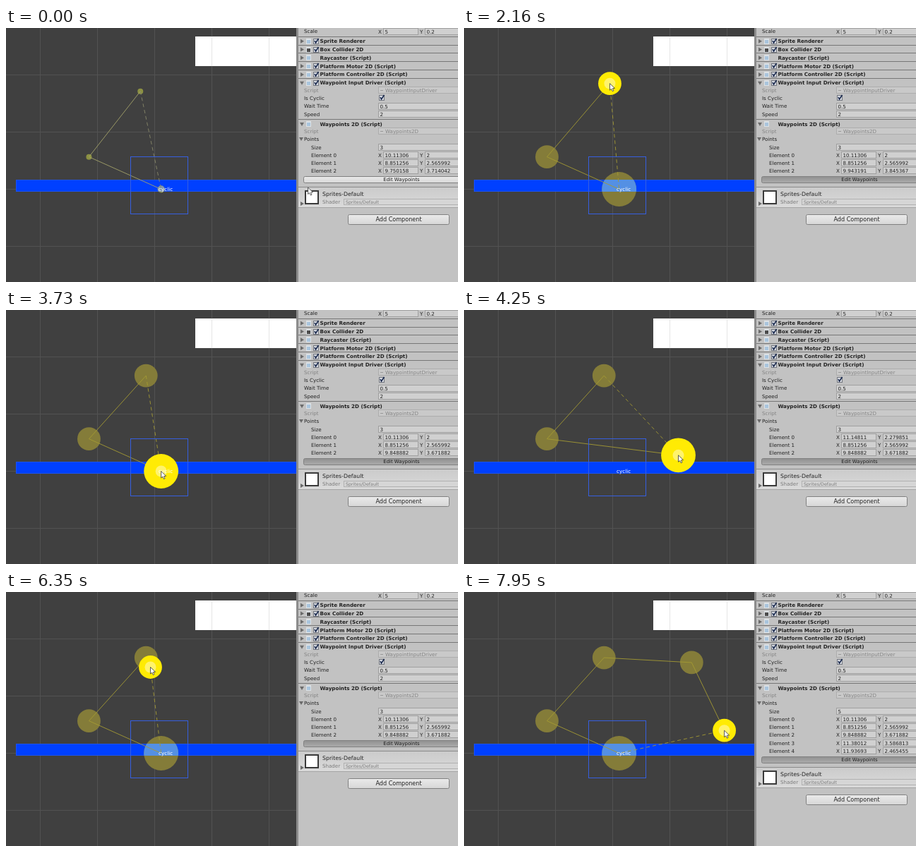
Recreate the animation shown at these times as an HTML page with a canvas. Size 640x360 px, loop 8 s.

```html
<!DOCTYPE html>
<html>
<head>
<meta charset="utf-8">
<style>
html, body { margin: 0; width: 100%; height: 100%; overflow: hidden; background: #404040; }
canvas { display: block; width: 640px; height: 360px; }
</style>
</head>
<body>
<canvas id="stage" width="640" height="360"></canvas>
<script>
const g = document.getElementById('stage').getContext('2d');
const LOOP = 8000, TICK = 70, CELL = 81;
const PRESS = 490, EDIT = 560, BLUR = 1680, UNDO = 5250;

const homes = [[10.11306, 2], [8.851256, 2.565992], [9.750158, 3.714042]];
// Pointer gestures in world units: start, end, x, y and the waypoint dragged, if any
const gestures = [
  [90, 290, 13.01, 2.14],
  [800, 1540, 9.716, 3.543],
  [1680, 2100, 9.95, 3.85, 2],
  [2100, 2520, 9.810214, 3.586813, 2],
  [2520, 2660, 9.848882, 3.671882, 2],
  [2660, 3080, 8.877, 2.543],
  [3210, 3530, 10.17, 1.93],
  [3710, 4130, 11.14811, 2.279851, 0],
  [4130, 4410, 11.14811, 2.279851, 0],
  [4410, 4690, 11.25, 2.42, 0],
  [4690, 4920, 11.83, 1.42],
  [5380, 5950, 9.83, 3.53],
  [6100, 6150, 9.926, 3.506],
  [6300, 6930, 9.96, 3.6, 3],
  [6930, 7000, 10.22009, 3.834285, 3],
  [7000, 7300, 11.38012, 3.586813, 3],
  [7490, 7840, 11.93693, 2.465455, 4],
  [7840, LOOP, 11.96, 2.36, 4]
];

// Replays all gestures up to time t; a new waypoint starts under the pointer
function pose(t) {
  const points = [...homes];
  let tip = [12.68, 2.03], dragged = -1;
  for (const [start, end, x, y, i = -1] of gestures) {
    if (t < start) break;
    const k = Math.sin(Math.min(1, (t - start) / (end - start)) * Math.PI / 2);
    const from = points[i] ?? tip;
    tip = [x, y].map((to, axis) => from[axis] + (to - from[axis]) * k);
    if (i < 0) continue;
    points[i] = tip;
    if (t < end) dragged = i;
  }
  if (t >= UNDO) points[0] = homes[0];
  return {points, tip, dragged};
}

const toScreen = ([x, y]) => [210.5 + (x - 10) * CELL, 228.5 - (y - 2) * CELL];
const number = v => String(Number(v.toPrecision(7)));

function rect(x, y, w, h, fill, stroke) {
  if (fill) { g.fillStyle = fill; g.fillRect(x, y, w, h); }
  if (stroke) { g.strokeStyle = stroke; g.strokeRect(x + .5, y + .5, w - 1, h - 1); }
}
function disc([x, y], r, fill) {
  g.fillStyle = fill;
  g.beginPath();
  g.arc(x, y, r, 0, 7);
  g.fill();
}
function path(points, fill, stroke, width = 1) {
  g.beginPath();
  points.forEach(p => g.lineTo(...p));
  if (fill) { g.closePath(); g.fillStyle = fill; g.fill(); }
  if (stroke) { g.lineWidth = width; g.strokeStyle = stroke; g.stroke(); g.lineWidth = 1; }
}
function shade(y, h, top, bottom) {
  const fill = g.createLinearGradient(0, y, 0, y + h);
  fill.addColorStop(0, top);
  fill.addColorStop(1, bottom);
  return fill;
}
function text(s, x, y, {size = 7.1, color = '#222', bold = '', align = 'left'} = {}) {
  g.font = `${bold} ${size}px "DejaVu Sans", sans-serif`;
  g.fillStyle = color;
  g.textAlign = align;
  g.fillText(s, x, y + size * .36);
}

const radius = (i, on) => on ? (i ? 16.4 : 24.4) : (i ? 4 : 5);

function grid(color) {
  for (let x = 48; x < 412; x += CELL) rect(x, 0, 1, 360, color);
  for (let y = 66; y < 360; y += CELL) rect(0, y, 412, 1, color);
}
function bar() {
  g.beginPath();
  g.rect(14, 215, 398, 17);
}

function scene(pts, on, active, pressed) {
  rect(0, 0, 412, 360, '#404040');
  grid('#525252');
  rect(268, 12, 144, 42, '#fff');
  for (let x = 291; x < 412; x += CELL) rect(x, 12, 1, 42, '#e6e6e6');
  rect(14, 215, 398, 17, '#0040ff', '#1c52f4');

  pts.forEach((p, i) => { if (i !== active) disc(p, radius(i, on), on ? '#847c39' : '#8c9142'); });
  if (active !== 0) {
    g.save();
    bar();
    g.clip();
    disc(pts[0], radius(0, on), on ? '#5490e4' : '#8299b4');
    g.restore();
  }
  const line = on ? '#a49a34' : '#a3a269';
  path(pts, null, line, .9);
  g.setLineDash([5, 4]);
  path([pts.at(-1), pts[0]], null, on ? line : '#88886a', .9);
  g.setLineDash([]);
  rect(176, 182, 82, 82, null, '#365fe0');
  if (active >= 0) {
    disc(pts[active], radius(active, on), '#ffeb04');
    if (pressed) disc(pts[active], 8, '#fff36c');
  }
  text('cyclic', 216, 228.5, {size: 7.2, color: '#fff'});
}

function arrow(x, y, open) {
  path(open ? [[x - 3, y - 2], [x + 3, y - 2], [x, y + 3]]
            : [[x - 2, y - 3], [x + 3, y], [x - 2, y + 3]], '#6a6a6a');
}
function check(x, y) {
  rect(x, y - 4, 8, 8, '#d6d9e0', '#737780');
  path([[x + 2, y - 1], [x + 3.5, y + 2], [x + 7.5, y - 4]], null, '#18284c', 1.6);
}
function field(x, y, w, value) {
  rect(x, y - 5, w, 10, '#d0d0d0', '#a0a0a0');
  text(value, x + 2.5, y);
}
function vector(y, a, b) {
  text('X', 527, y);
  field(534, y, 50, a);
  text('Y', 586, y);
  field(593, y, 50, b);
}
function header(y, title, {icon = '#a9c4dc', checked, open} = {}) {
  rect(414, Math.round(y - 7), 226, 1, '#777');
  arrow(419, y, open);
  rect(425, Math.round(y - 4), 7, 8, '#dde2e6');
  rect(426, Math.round(y - 2), 5, 5, icon);
  if (checked) check(435, Math.round(y));
  text(title, 444.5, y, {size: 7.15, bold: 'bold'});
}
function scriptRow(y, name) {
  text('Script', 422, y, {color: '#858585'});
  rect(527, y - 5, 116, 10, '#c9c9c9', '#adadad');
  rect(530, y, 4, 1, '#999');
  text(name, 537, y, {color: '#858585'});
}
function button(x, y, w, h, label, size, dark) {
  g.beginPath();
  g.roundRect(x + .5, y + .5, w - 1, h - 1, 2);
  g.fillStyle = dark ? shade(y, h, '#8f8f8f', '#adadad') : shade(y, h, '#ebebeb', '#d6d6d6');
  g.fill();
  g.strokeStyle = '#808080';
  g.stroke();
  text(label, x + w / 2, y + h / 2, {size, align: 'center'});
}

function inspector(values, pressed, focus) {
  rect(411, 0, 229, 360, '#8c8c8c');
  rect(414, 0, 226, 360, '#c2c2c2');
  text('Scale', 422, 4.5);
  vector(5, '5', '0.2');
  ['Sprite Renderer', 'Box Collider 2D', 'Raycaster (Script)', 'Platform Motor 2D (Script)',
   'Platform Controller 2D (Script)', 'Waypoint Input Driver (Script)'
  ].forEach((title, i) => header(18.7 + i * 11.8, title, {
    icon: i === 1 ? '#4b4b4b' : undefined, checked: i !== 2, open: i === 5
  }));
  scriptRow(88, 'WaypointInputDriver');
  text('Is Cyclic', 422, 99.5);
  check(528, 99);
  text('Wait Time', 422, 110.5);
  field(527, 111, 116, '0.5');
  text('Speed', 422, 122);
  field(527, 122, 116, '2');
  header(136, 'Waypoints 2D (Script)', {open: true});
  scriptRow(146, 'Waypoints2D');
  arrow(418, 157, true);
  text('Points', 422, 157.5);

  text('Size', 432, 169, {color: focus ? '#2560e0' : undefined});
  field(527, 169, 116, String(values.length));
  if (focus) rect(527, 164, 116, 10, null, '#4a78d8');
  values.forEach(([x, y], i) => {
    const row = 180 + Math.round(i * 11.2);
    text('Element ' + i, 432, row + .5);
    vector(row, number(x), number(y));
  });

  g.save();
  g.translate(0, Math.round((values.length - 3) * 11.3));
  button(421, 210, 278, 10, 'Edit Waypoints', 6.9, pressed);
  rect(414, 225, 226, 1, '#8a8a8a');
  rect(414, 226, 226, 28, shade(226, 28, '#cbcbcb', '#dadada'));
  rect(414, 254, 226, 1, '#a4a4a4');
  rect(423, 230, 20, 20, '#fff');
  g.lineWidth = 2;
  rect(423.5, 230.5, 19, 19, null, '#3a3a3a');
  g.lineWidth = 1;
  text('Sprites-Default', 448, 235, {size: 7.8});
  text('Shader', 448, 246.5, {color: '#7c7c7c'});
  rect(478, 242, 220, 9, '#d6d6d6', '#b0b0b0');
  text('Sprites/Default', 481, 246.5, {size: 6.3, color: '#7c7c7c'});
  arrow(419, 249);
  button(484, 264, 144, 15, 'Add Component', 8.1);
  g.restore();
}

function cursor([x, y]) {
  const shape = [[0, 0], [0, 9.5], [2.2, 7.6], [3.8, 11], [5.4, 10.2], [4, 7], [7, 6.8], [0, 0]];
  path(shape.map(([a, b]) => [x + a, y + b]), '#fff', '#333', .8);
}

function draw(t) {
  const now = Math.floor(t / TICK) * TICK, on = now >= EDIT;
  const {points, tip, dragged} = pose(now);
  const pts = points.map(toScreen), [px, py] = toScreen(tip);
  const pressed = dragged >= 0;
  const hovered = pts.findLastIndex(([x, y], i) => Math.hypot(x - px, y - py) < radius(i, on));
  scene(pts, on, pressed ? dragged : on ? hovered : -1, pressed);
  // While dragging, the inspector trails the scene by one tick
  inspector(pressed ? pose(now - TICK).points : points, now >= PRESS, on && now < BLUR);
  cursor([px, py]);
}

const start = performance.now();
(function frame() {
  draw((performance.now() - start) % LOOP);
  requestAnimationFrame(frame);
})();
</script>
</body>
</html>
```
